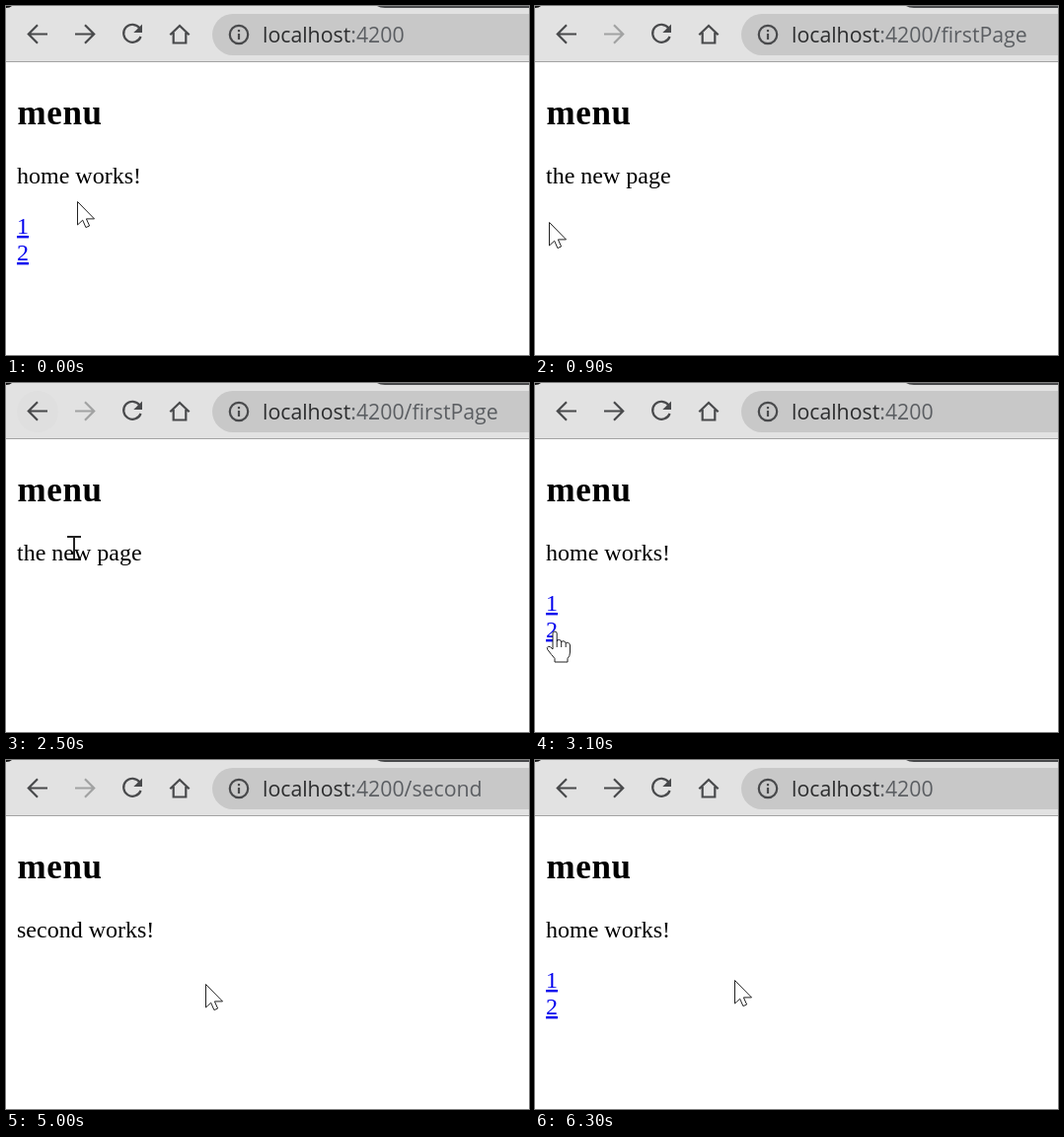
These frames come from a looping animation (530x354 px, 6.4 s). An HTML page:

```html
<!DOCTYPE html>
<html lang="en">
<head>
<meta charset="utf-8">
<title>menu</title>
<style>
  html, body { margin: 0; width: 100%; height: 100%; overflow: hidden; background: #fff; }
  svg { display: block; width: 530px; height: 354px; }
  .page { font: 24px "Liberation Serif", "Times New Roman", serif; }
  .page .title { font-size: 35px; font-weight: 700; letter-spacing: .6px; }
  .url { font: 21.3px "Open Sans", sans-serif; fill: #5b5e62; white-space: pre; }
  .url .host { fill: #2c2d2e; }
  .link { fill: #0000ee; text-decoration: underline; }
  .icon { fill: none; stroke: #48494b; stroke-width: 2.2; }
  #cursor path { fill: #fff; stroke: #222; stroke-linejoin: round; }
  #cursor .line { fill: none; }
</style>
</head>
<body>
<svg viewBox="0 0 530 354">
  <rect width="530" height="56" fill="#e2e2e2"/>
  <rect y="56" width="530" height="1" fill="#a3a3a3"/>
  <path d="M0 0H6Q4 2 0 2Z" fill="#111"/>
  <path d="M376 0Q379 2 384 2H530V0Z" fill="#48494b"/>
  <circle id="hover" cx="32" cy="29" r="21" fill="#dfdfdf"/>

  <g class="icon">
    <path id="back" d="M42 28.5H23.5M32 19.3L22.8 28.5 32 37.7"/>
    <use id="forward" href="#back" transform="translate(112 0) scale(-1 1)"/>
    <path d="M135.5 22.5A9 9 0 1 0 136.6 31"/>
    <path d="M138 18.5V27H129.3Z" fill="#48494b" stroke="none"/>
    <path d="M166.3 29.3L176 20 185.7 29.3M169.7 27V37.5H182.3V27"/>
  </g>

  <rect x="209" y="8" width="360" height="42" rx="21" fill="#c8c8c8"/>
  <g class="icon">
    <circle cx="236" cy="29" r="9.2"/>
    <path d="M236 24V26.2M236 28V34"/>
  </g>
  <text class="url" x="260" y="37"><tspan class="host">localhost</tspan><tspan id="path"></tspan></text>

  <g class="page">
    <text class="title" x="11.5" y="120">menu</text>
    <text id="body" x="11" y="180"></text>
    <g id="links" class="link">
      <text x="11" y="231">1</text>
      <text x="11" y="258">2</text>
    </g>
  </g>

  <g id="cursor">
    <path id="arrow" d="M.5 .5V24L5.7 19.2 8.9 26.6 12.6 25 9.4 17.9H17.5Z"/>
    <g id="hand">
      <path d="M-2 18V2Q-2 0 0 0T2.2 2V10Q2.5 8.5 4.5 8.5T6.7 11Q7 9.5 9 9.8T11.2 12Q11.8 11 13.5 11.4T15.5 14V21Q15.5 25 13 27.5V31H0V27.5Q-3 24-7.2 18.5-8.5 16-6.5 15.2-4.5 15-2 18Z"/>
      <path class="line" d="M2.2 10V16M6.7 11V16M11.2 12V16"/>
    </g>
    <path id="beam" class="line" stroke-width="2" d="M-7-11H7M0-11V12M-7 12H7"/>
  </g>
</svg>
<script>
const LOOP = 6400, STEP = 100;
const $ = id => document.getElementById(id);

const pages = {
  home: { path: ":4200", body: "home works!" },
  first: { path: ":4200/firstPage", body: "the new page" },
  second: { path: ":4200/second", body: "second works!" }
};
const visits = [[0, "home"], [800, "first"], [2600, "home"], [3700, "second"], [5300, "home"]];

// where the pointer rests or turns: time, x, y
const stops = [
  [0, 72, 198], [500, 13, 221], [900, 14, 219], [1700, 178, 157], [2200, 34, 30],
  [2500, 69, 167], [3000, 20, 252], [3800, 21, 251], [4900, 202, 227], [LOOP, 202, 223]
];

const ease = k => k * k * (3 - 2 * k);
const within = (x, y, l, t, r, b) => x >= l && x <= r && y >= t && y <= b;
const show = (id, on) => $(id).setAttribute("visibility", on ? "visible" : "hidden");

function pointerAt(t) {
  const i = stops.findIndex(s => s[0] > t);
  const [t0, x0, y0] = stops[i - 1], [t1, x1, y1] = stops[i];
  const k = ease((t - t0) / (t1 - t0));
  return [Math.round(x0 + (x1 - x0) * k), Math.round(y0 + (y1 - y0) * k)];
}

function pointerKind(x, y, home) {
  if (home && within(x, y, 10, 209, 24, 264)) return "hand";
  if (within(x, y, 10, 158, 138, 186) || within(x, y, 10, 88, 98, 128)) return "beam";
  return "arrow";
}

function draw(ms) {
  const t = Math.floor((ms % LOOP) / STEP) * STEP;
  const name = visits.filter(v => v[0] <= t).pop()[1];
  const home = name === "home";
  const [x, y] = pointerAt(t);
  const kind = pointerKind(x, y, home);

  $("path").textContent = pages[name].path;
  $("body").textContent = pages[name].body;
  show("links", home);
  show("hover", t >= 2100 && t < 2600);
  $("forward").setAttribute("opacity", home ? 1 : 0.42);
  $("cursor").setAttribute("transform", `translate(${x} ${y})`);
  for (const id of ["arrow", "hand", "beam"]) show(id, id === kind);
}

const start = performance.now();
function tick() {
  draw(performance.now() - start);
  requestAnimationFrame(tick);
}
tick();
</script>
</body>
</html>
```
